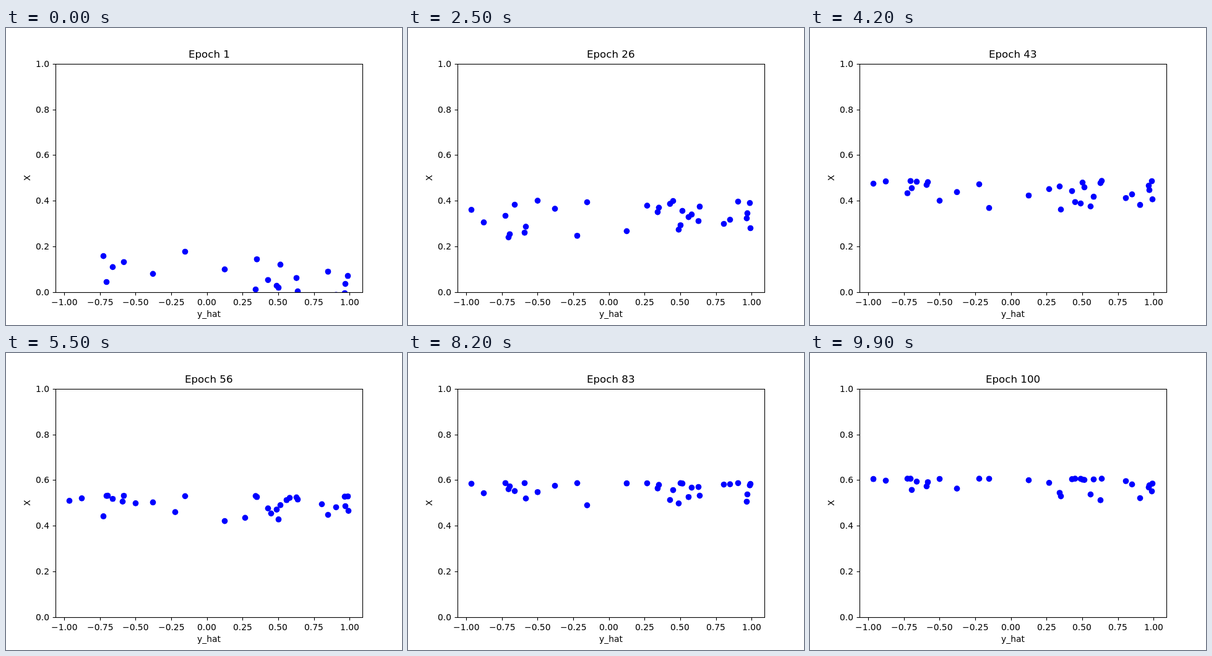
An HTML page that plays this animation: 640x480 px, repeating every 10 s.

```html
<!DOCTYPE html>
<html>
<head>
<meta charset="utf-8">
<style>
  html, body { margin: 0; width: 100%; height: 100%; overflow: hidden; background: #fff; }
  svg { display: block; font: 13.889px "DejaVu Sans", sans-serif; }
  .line { fill: none; stroke: #000; stroke-width: 1.11; }
</style>
</head>
<body>
<svg id="plot" width="640" height="480" viewBox="0 0 640 480">
  <clipPath id="area"><rect x="80" y="57.6" width="496" height="369.6"/></clipPath>
  <g id="dots" clip-path="url(#area)" fill="#00f"></g>
  <g id="axes"></g>
  <rect class="line" x="80.5" y="58.5" width="496" height="369"/>
  <text id="title" y="48" font-size="16.667"></text>
  <text transform="translate(39 247) rotate(-90)">X</text>
</svg>
<script>
const byId = id => document.getElementById(id);
const svgNS = 'http://www.w3.org/2000/svg';

function add(parent, tag, attrs) {
  const el = parent.appendChild(document.createElementNS(svgNS, tag));
  for (const name in attrs) el.setAttribute(name, attrs[name]);
  return el;
}

// Writes text on whole pixels; align 0.5 centres it on x, 1 ends it there
function write(el, text, x, align) {
  el.textContent = text;
  el.setAttribute('x', Math.round(x - el.getComputedTextLength() * align));
}

const snap = v => Math.floor(v + 0.5) + 0.5;
const axes = byId('axes');
for (let i = 0; i < 9; i++) {
  const x = 94.2 + 57.62 * i, value = i / 4 - 1;
  add(axes, 'path', { class: 'line', d: `M${snap(x)} 427.5v4.86` });
  const label = (value < 0 ? '\u2212' : '') + Math.abs(value).toFixed(2);
  write(add(axes, 'text', { y: 448 }), label, x, 0.5);
}
for (let i = 0; i < 6; i++) {
  const y = 427.2 - 73.92 * i;
  add(axes, 'path', { class: 'line', d: `M80.5 ${snap(y)}h-4.86` });
  write(add(axes, 'text', { y: Math.round(y + 5) }), (i / 5).toFixed(1), 70.3, 1);
}
write(add(axes, 'text', { y: 467 }), 'y_hat', 328, 0.5);

const xs = [102, 122, 157, 162, 164, 172, 188, 190, 209, 237, 273, 289, 353, 386, 403, 405,
  423, 428, 437, 440, 443, 453, 458, 469, 471, 510, 520, 533, 547, 548, 552, 553];
const dots = xs.map(x => add(byId('dots'), 'circle', { cx: x + 0.5, r: 4.86 }));

function noise(epoch, i) {
  const v = Math.sin(epoch * 12.9898 + i * 78.233) * 43758.5453;
  return v - Math.floor(v);
}

// The band of dots rises and narrows; each epoch deals its heights out anew
function pose(epoch) {
  const top = 190 + 171 * Math.exp((1 - epoch) / 38);
  const low = 225 + 238 * Math.exp((1 - epoch) / 33.5);
  const bend = 0.75 + epoch / 44;
  const order = [...dots.keys()].sort((a, b) => noise(epoch, a) - noise(epoch, b));
  order.forEach((dot, rank) => {
    const spread = (rank / (dots.length - 1)) ** bend;
    dots[dot].setAttribute('cy', top + (low - top) * spread + 0.5);
  });
}

let shown = 0;
function draw() {
  const epoch = Math.floor(performance.now() % 10000 / 100) + 1;
  if (epoch !== shown) {
    shown = epoch;
    write(byId('title'), 'Epoch ' + epoch, 328, 0.5);
    pose(epoch);
  }
  requestAnimationFrame(draw);
}
draw();
</script>
</body>
</html>
```
